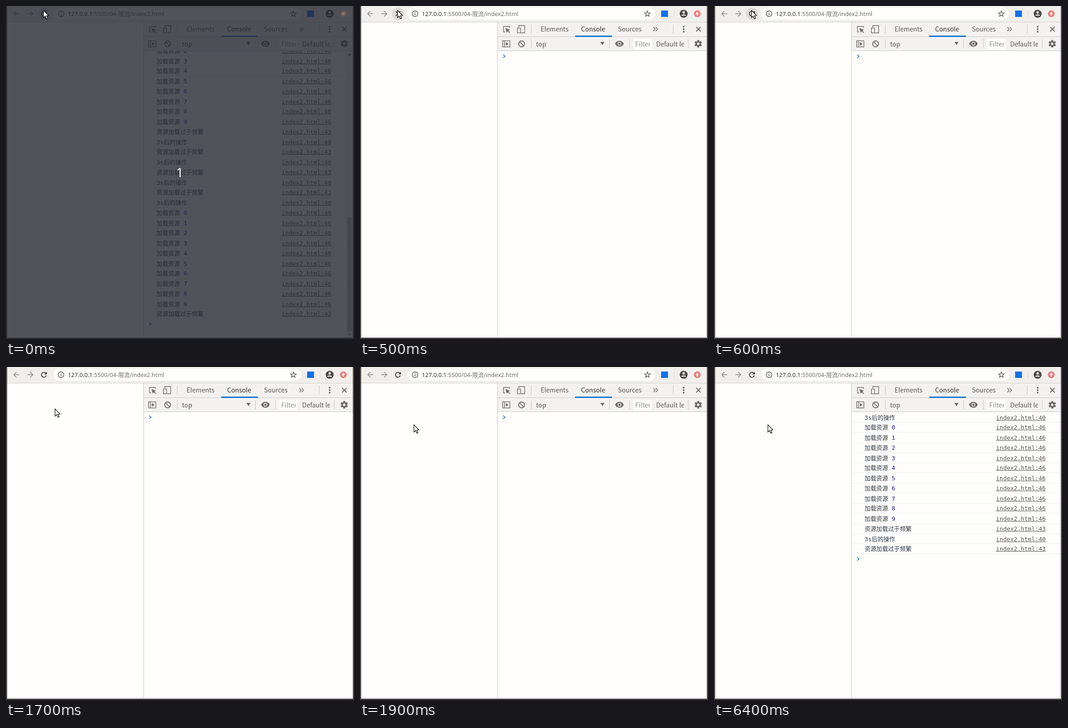
An HTML page with a canvas that plays this animation: 765x732 px, repeating every 8 s.

```html
<!DOCTYPE html>
<html lang="zh">
<head>
<meta charset="utf-8">
<title>Console</title>
<style>
html, body { margin: 0; width: 100%; height: 100%; overflow: hidden; background: #fffefd; }
canvas { display: block; }
</style>
</head>
<body>
<canvas id="stage" width="765" height="732"></canvas>
<script>
const ctx = document.getElementById('stage').getContext('2d');
const LOOP = 8000;
const ROW = 22.25;
const UI = '"Noto Sans CJK SC", "Noto Sans", sans-serif';
const LATIN = '"Noto Sans", "Noto Sans CJK SC", sans-serif';
const MONO = '12.93px "DejaVu Sans Mono", "Noto Sans CJK SC", monospace';
const ICON = '#6a6a6a';

const load = n => ({ text: '加载资源', n, line: 46 });
const busy = { text: '资源加载过于频繁', line: 43 };
const later = { text: '3s后的操作', line: 40 };
const loads = Array.from({ length: 10 }, (_, n) => load(n));
const oldLog = [...loads.slice(2), ...Array(4).fill([busy, later]).flat(), ...loads, busy];
const firstLog = [later, ...loads, busy];
const secondLog = [...firstLog, later, busy];

function box(x, y, w, h, color) {
  ctx.fillStyle = color;
  ctx.fillRect(x, y, w, h);
}

function disc(x, y, r, color) {
  ctx.fillStyle = color;
  ctx.beginPath();
  ctx.arc(x, y, r, 0, 7);
  ctx.fill();
}

function ring(x, y, r, color, width) {
  ctx.strokeStyle = color;
  ctx.lineWidth = width;
  ctx.beginPath();
  ctx.arc(x, y, r, 0, 7);
  ctx.stroke();
}

function trace(points, x = 0, y = 0) {
  ctx.beginPath();
  for (let i = 0; i < points.length; i += 2) ctx.lineTo(x + points[i], y + points[i + 1]);
}

function line(points, color, width) {
  trace(points);
  ctx.strokeStyle = color;
  ctx.lineWidth = width;
  ctx.stroke();
}

function shape(points, color) {
  trace(points);
  ctx.fillStyle = color;
  ctx.fill();
}

function frameRect(x, y, w, h, color, width) {
  ctx.strokeStyle = color;
  ctx.lineWidth = width;
  ctx.strokeRect(x, y, w, h);
}

function label(text, x, y, font, color) {
  ctx.font = font;
  ctx.fillStyle = color;
  ctx.fillText(text, x, y);
  return x + ctx.measureText(text).width;
}

function clipped(x, y, w, h, draw) {
  ctx.save();
  ctx.beginPath();
  ctx.rect(x, y, w, h);
  ctx.clip();
  draw();
  ctx.restore();
}

function arrow(x, dir) {
  line([x - 6 * dir, 17, x + 6 * dir, 17], '#8e8d8b', 1.6);
  line([x, 11, x + 6 * dir, 17, x, 23], '#8e8d8b', 1.6);
}

function reloadIcon(loading) {
  if (loading) {
    line([78.5, 12, 88.5, 22], '#3e3e3e', 1.8);
    line([88.5, 12, 78.5, 22], '#3e3e3e', 1.8);
    return;
  }
  ctx.strokeStyle = '#3e3e3e';
  ctx.lineWidth = 1.8;
  ctx.beginPath();
  ctx.arc(83.3, 17, 5.4, 0.3, 5.5);
  ctx.stroke();
  shape([90, 10.5, 90, 16.3, 84.2, 16.3], '#3e3e3e');
}

function star(x, y) {
  const points = [];
  for (let i = 0; i < 10; i++) {
    const r = i % 2 ? 2.8 : 6.6, a = i * Math.PI / 5;
    points.push(x + r * Math.sin(a), y - r * Math.cos(a));
  }
  trace(points);
  ctx.closePath();
  ctx.strokeStyle = '#555';
  ctx.lineWidth = 1.3;
  ctx.stroke();
}

function browserBar(hover, loading) {
  box(0, 0, 765, 35, '#f1efec');
  box(0, 35, 765, 1, '#d3d1ce');
  arrow(23, -1);
  arrow(53, 1);
  if (hover) disc(83.5, 17, 13.5, '#dddbd8');
  reloadIcon(loading);

  ctx.fillStyle = '#fffefd';
  ctx.beginPath();
  ctx.roundRect(104, 3.5, 545, 26.5, 13.2);
  ctx.fill();
  ring(121, 17, 6.2, '#555', 1.4);
  box(120.3, 16, 1.5, 4.5, '#555');
  box(120.3, 13.3, 1.5, 1.6, '#555');
  const x = label('127.0.0.1', 136, 21.5, '12.8px ' + LATIN, '#303030');
  label(':5500/04-限流/index2.html', x, 21.5, '12.8px ' + LATIN, '#707070');
  star(631.7, 17.3);

  box(662, 10, 15, 14, '#1070ea');
  box(690, 10, 1, 14, '#d3d1ce');
  disc(711.5, 17, 8.7, '#484848');
  disc(711.5, 14, 2.7, '#f1efec');
  ctx.beginPath();
  ctx.ellipse(711.5, 21.2, 5.3, 2.8, 0, Math.PI, 0);
  ctx.fill();
  disc(741.5, 17, 7.6, '#e98182');
  shape([741.5, 13, 745.3, 17, 743, 17, 743, 20.5, 740, 20.5, 740, 17, 737.7, 17], '#fff');
}

function gear(x, y) {
  ctx.fillStyle = ICON;
  for (let i = 0; i < 6; i++) {
    ctx.save();
    ctx.translate(x, y);
    ctx.rotate(i * Math.PI / 3);
    ctx.fillRect(-2.2, -8.2, 4.4, 4.5);
    ctx.restore();
  }
  disc(x, y, 6, ICON);
  disc(x, y, 2.7, '#f3f2f1');
}

function eye(x, y) {
  ctx.fillStyle = ICON;
  ctx.beginPath();
  ctx.moveTo(x - 9.5, y);
  ctx.bezierCurveTo(x - 6, y - 8.7, x + 6, y - 8.7, x + 9.5, y);
  ctx.bezierCurveTo(x + 6, y + 8.7, x - 6, y + 8.7, x - 9.5, y);
  ctx.fill();
  disc(x, y, 4.2, '#f3f2f1');
  disc(x, y, 2.5, ICON);
}

function devtoolsBars() {
  const font = '14.1px ' + UI;
  box(302, 36, 1, 693, '#c8c7c6');
  box(303, 36, 460, 63, '#f3f2f1');
  box(303, 67, 460, 1, '#cbcac9');
  box(303, 98, 460, 1, '#cbcac9');

  line([319, 57, 315.5, 57, 315.5, 45, 328.5, 45, 328.5, 48], ICON, 1.4);
  shape([319.5, 48.5, 330, 52.3, 326, 54, 330, 58, 328.7, 59.3, 324.7, 55.3, 323, 59], ICON);
  line([349, 47, 349, 43, 362, 43, 362, 59, 354, 59], ICON, 1.4);
  frameRect(346, 48.5, 7, 10.5, ICON, 1.4);
  label('Elements', 397, 56, font, '#5a5a5a');
  label('Console', 486, 56, font, '#333');
  label('Sources', 567, 56, font, '#5a5a5a');
  box(473, 65, 81, 3, '#1174d0');
  for (const x of [645, 650]) line([x, 46.5, x + 4, 51, x, 55.5], ICON, 1.5);
  for (const y of [45.5, 51, 56.5]) disc(711.5, y, 1.9, ICON);
  line([739, 46, 749, 56], ICON, 1.8);
  line([749, 46, 739, 56], ICON, 1.8);

  frameRect(313.5, 76.5, 16, 13.5, ICON, 1.4);
  line([317.5, 76.5, 317.5, 90], ICON, 1.4);
  shape([320.5, 79.3, 326.5, 83.2, 320.5, 87.2], ICON);
  ring(355.3, 83.3, 6.5, ICON, 1.9);
  line([350.7, 78.7, 359.9, 87.9], ICON, 1.9);
  label('top', 387, 88.5, font, '#5a5a5a');
  shape([528.5, 79, 537.5, 79, 533, 86], ICON);
  eye(570.3, 83);
  box(601, 72, 40, 23, '#fffefd');
  clipped(601, 72, 36, 23, () => label('Filter', 605, 88.5, font, '#8b8b8b'));
  clipped(645, 72, 67, 23, () => label('Default levels', 651, 88.5, font, '#5a5a5a'));
  gear(743.5, 83);

  for (const [x, y] of [[376, 41], [688, 41], [376, 73], [548, 73], [592, 73], [721, 73]])
    box(x, y, 1, 20, '#c6c5c4');
}

// Pixel snapping lifts the text of every fourth row.
const textOffset = i => Math.floor(ROW * i) - (i % 4 === 1 ? 1 : 0);

function logRow(row, base, right) {
  const end = label(row.text, 331, base, MONO, '#303942');
  if (row.n !== undefined) label(' ' + row.n, end, base, MONO, '#1c10a8');
  const link = 'index2.html:' + row.line;
  const width = ctx.measureText(link).width;
  label(link, right - width, base, MONO, '#545454');
  box(right - width, base + 1, width, 1, '#545454');
}

// The row with index 0 has its baseline at base; a scrolled log starts above it.
function consoleLog(rows, base, firstIndex, scrolled) {
  const edge = scrolled ? 748 : 762;
  clipped(303, 99, 460, 630, () => {
    rows.forEach((row, n) => {
      const i = n + firstIndex;
      logRow(row, base + textOffset(i), scrolled ? 715 : 729);
      box(303, Math.floor(base + 5.5 + i * ROW), edge - 303, 1, '#f0efee');
    });
  });
  const y = base - 5.6 + (rows.length + firstIndex) * ROW;
  line([314.7, y - 3.4, 318.8, y, 314.7, y + 3.4], '#3677cf', 1.7);
  if (!scrolled) return;
  box(748, 99, 14, 630, '#f2f1f0');
  box(750, 464, 10, 251, '#c0bfbe');
  shape([751, 108.5, 759, 108.5, 755, 104], '#505050');
  shape([751, 720, 759, 720, 755, 724.5], '#a3a3a3');
}

function windowBorder() {
  const color = '#494643';
  box(0, 0, 2.5, 732, color);
  box(762.5, 0, 2.5, 732, color);
  box(0, 729, 765, 3, color);
}

function pointer(x, y) {
  trace([0, 0, 0, 16, 3.7, 12.7, 6.3, 18.6, 9, 17.4, 6.4, 11.7, 11, 11.3], x, y);
  ctx.closePath();
  ctx.fillStyle = '#fff';
  ctx.strokeStyle = '#151515';
  ctx.lineWidth = 1.3;
  ctx.fill();
  ctx.stroke();
}

// The pointer is sampled every 100 ms and slows down as it arrives.
function pointerPosition(t) {
  if (t < 1600) return [82.5, 9.5];
  const k = Math.min(1, Math.floor((t - 1600) / 100) / 3);
  const ease = 1 - (1 - k) ** 2;
  return [94.5 + 24 * ease, 48.5 + 78.5 * ease];
}

function countdown() {
  box(0, 0, 765, 732, 'rgba(38,40,50,0.8)');
  disc(741.5, 17, 7, '#6a5a57');
  disc(741.5, 17, 3.2, '#85766c');
  ctx.textAlign = 'center';
  label('1', 382, 376, '28px ' + LATIN, '#fff');
  ctx.textAlign = 'left';
}

function draw(t) {
  box(0, 0, 765, 732, '#fffefd');
  browserBar(t < 1700, t >= 500 && t < 600);
  devtoolsBars();
  if (t < 500) consoleLog(oldLog, 126, -1, true);
  else consoleLog(t < 3500 ? [] : t < 6400 ? firstLog : secondLog, 116, 0, false);
  windowBorder();
  if (t < 300) countdown();
  pointer(...pointerPosition(t));
}

const start = performance.now();
function tick() {
  draw((performance.now() - start) % LOOP);
  requestAnimationFrame(tick);
}
tick();
</script>
</body>
</html>
```
